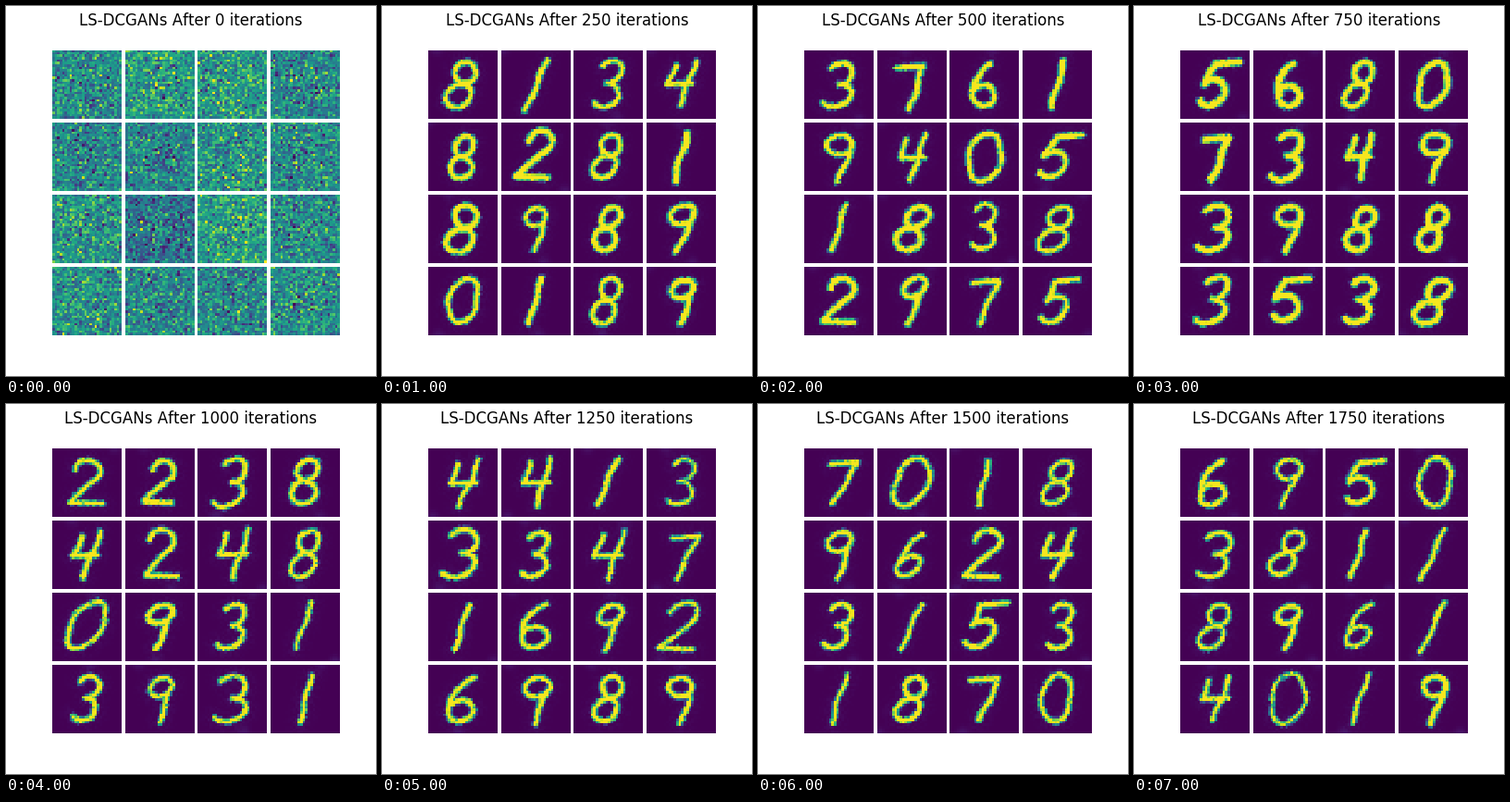
Recreate the animation shown at these times as a matplotlib script. Size 400 by 400 pixels, loop 8 s.

```python
import numpy as np
import matplotlib.pyplot as plt
from matplotlib.animation import FuncAnimation

N = 28                      # samples are N x N pixels
plt.rcParams["text.kerning_factor"] = 6
rng = np.random.default_rng(11)
grid_y, grid_x = np.mgrid[0:N, 0:N] + 0.5


def arc(cx, cy, rx, ry, start, end):
    """Elliptic arc, clockwise in degrees, y pointing down."""
    a = np.radians(np.linspace(start, end, 50))
    return np.column_stack([cx + rx * np.cos(a), cy + ry * np.sin(a)])


def line(*corners):
    t = np.linspace(0, len(corners) - 1, 50)
    xs, ys = zip(*corners)
    steps = range(len(corners))
    return np.column_stack([np.interp(t, steps, xs), np.interp(t, steps, ys)])


# Digits as pen strokes; the top is y = -1 and the bottom y = 1.
GLYPHS = {d: np.vstack(strokes) for d, strokes in {
    "0": [arc(0, 0, .65, 1, 0, 360)],
    "1": [line((0, -1), (0, 1))],
    "2": [arc(0, -.5, .5, .5, -170, 40), line((.38, -.18), (-.6, .85), (.7, .9))],
    "3": [arc(-.05, -.5, .5, .48, -150, 90), arc(-.05, .47, .6, .5, -90, 140)],
    "4": [line((-.4, -.8), (-.55, .05), (.5, 0)), line((.4, -1), (.15, 1))],
    "5": [line((.7, -.95), (-.3, -.85), (-.45, -.1)), arc(-.05, .35, .55, .55, -140, 140)],
    "6": [arc(.5, .4, 1, 1.4, 180, 250), arc(0, .5, .5, .45, 0, 360)],
    "7": [line((-.55, -.75), (.5, -.85), (0, 1))],
    "8": [arc(.05, -.5, .42, .45, 0, 360), arc(-.05, .48, .5, .48, 0, 360)],
    "9": [arc(-.05, -.5, .45, .4, 0, 360), line((.4, -.6), (.1, 1))],
}.items()}


def handwrite(digit, half):
    """One digit with a random slant, size, wobble and pen pressure."""
    x, y = GLYPHS[digit].T
    lean = 0.32 if digit == "1" else 0.2
    x = x - rng.normal(lean, 0.08) * y + 0.05 * np.sin(4 * y + rng.uniform(0, 6))
    scale = rng.uniform(8.8, 10)
    x = N / 2 + scale * rng.uniform(0.9, 1.15) * x + rng.normal(0, 0.3)
    y = N / 2 + scale * y + rng.normal(0, 0.3)
    dist = np.hypot(grid_x[..., None] - x, grid_y[..., None] - y).min(axis=-1)
    edge = half + rng.normal(0.6, 0.1) + rng.normal(0, 0.16, (N, N))
    body = np.clip((edge - dist) / 1.15, 0, 0.985)
    haze = 0.04 * np.exp(-dist**2 / 20) * rng.random((N, N))
    sx, sy = rng.uniform(0, N), rng.choice([0, N])
    smudge = 0.05 * np.exp(-((grid_x - sx)**2 + (grid_y - sy)**2) / 6)
    return np.maximum(body, haze + smudge)


def write(half, digits):
    return [handwrite(d, half) for d in digits.replace(" ", "")]


def static():
    means = rng.normal(0.48, 0.05, (16, 1, 1))
    r2 = (grid_x - N / 2)**2 + (grid_y - N / 2)**2
    spread = 0.14 + 0.05 * np.exp(-r2 / 90)
    return np.clip(means + spread * rng.normal(size=(16, N, N)), 0, 1)


sheets = [
    static(),
    write(1.2, "8134 8281 8989 0189"),
    write(1.2, "3761 9405 1838 2975"),
    write(1.4, "5680 7349 3988 3538"),
    write(1.1, "2238 4248 0931 3931"),
    write(1.1, "4413 3347 1692 6989"),
    write(1.1, "7018 9624 3153 1870"),
    write(1.1, "6950 3811 8961 4019"),
]

fig, axes = plt.subplots(4, 4, figsize=(4, 4), dpi=100, gridspec_kw=dict(
    left=0.125, right=0.9, bottom=0.11, top=0.88, wspace=0.05, hspace=0.05))
title = fig.suptitle("", y=0.9825, fontsize=12, fontfamily="DejaVu Sans")
images = []
for ax in axes.flat:
    ax.axis("off")
    images.append(ax.imshow(np.zeros((N, N)), cmap="viridis", vmin=0, vmax=1,
                            interpolation="nearest"))


def update(i):
    title.set_text(f"LS-DCGANs After {250 * i} iterations")
    for image, sample in zip(images, sheets[i]):
        image.set_data(sample)
    return [title, *images]


anim = FuncAnimation(fig, update, frames=len(sheets), interval=1000, repeat=True, blit=False)
plt.show()
```
